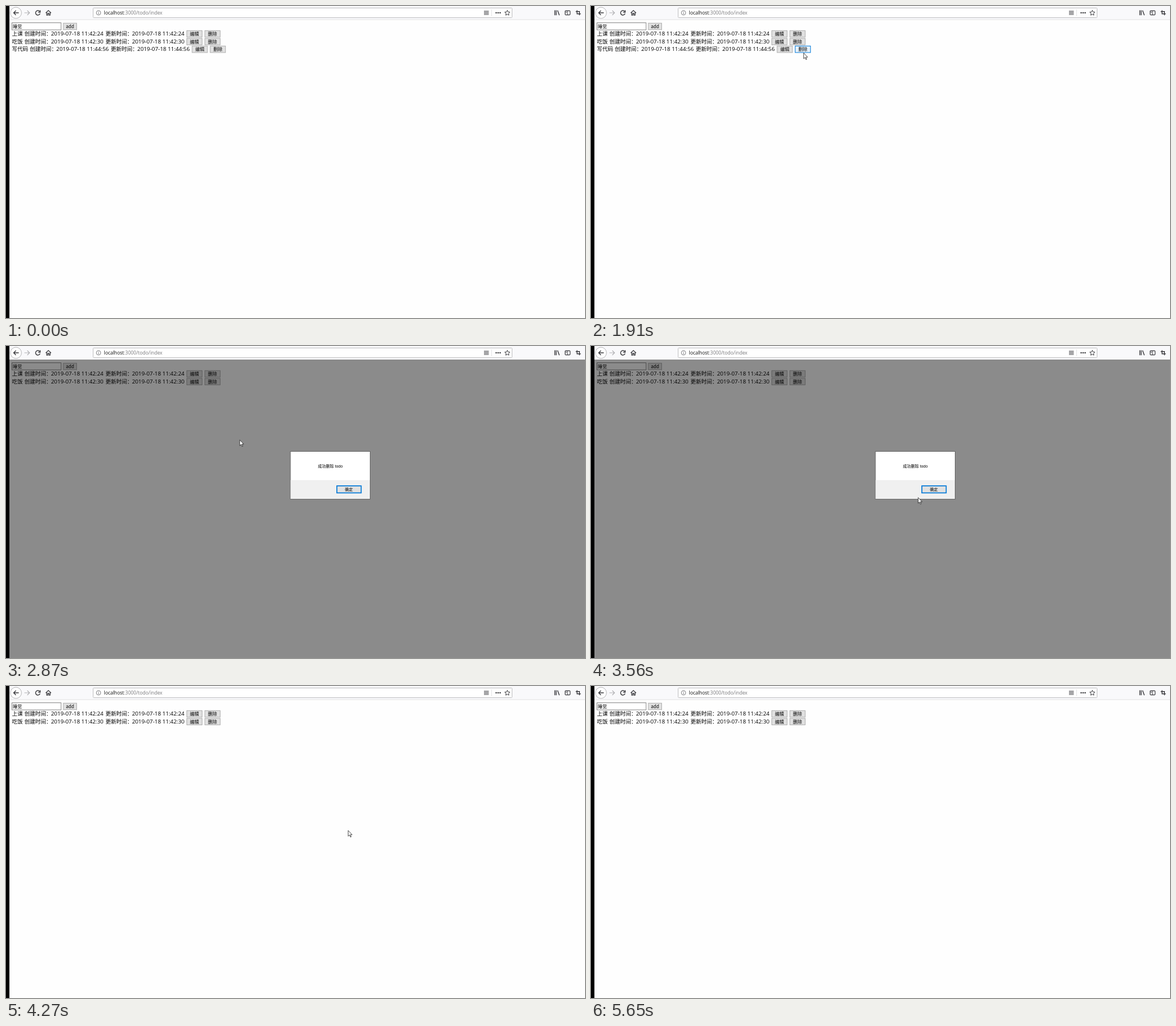
These frames come from a looping animation (1020x549 px, 6.05 s). An HTML page:

```html
<!DOCTYPE html>
<html lang="zh-CN">
<head>
<meta charset="utf-8">
<title>todo</title>
<style>
html, body { margin: 0; width: 100%; height: 100%; overflow: hidden; background: #fefefe }
svg { display: block; width: 1020px; height: 549px }
text { font: 9.5px "Noto Sans CJK SC", "Noto Sans CJK", sans-serif }
.latin { font: 9.8px "Open Sans", "Noto Sans", sans-serif }
.url { font: 8.45px "Open Sans", "Noto Sans", sans-serif }
.small { font-size: 8px; text-anchor: middle }
.alert { font: 7px "Liberation Sans", "Noto Sans CJK SC", "Noto Sans CJK", sans-serif; text-anchor: middle }
.icon { fill: none; stroke: #3a3a3e; stroke-width: 1.2 }
</style>
</head>
<body>
<svg viewBox="0 0 1020 549">
  <rect width="1020" height="549" fill="#fefefe"/>
  <rect x="6" width="1014" height="24" fill="#f9f9fb"/>
  <path d="M6 24H1020" stroke="#e1e1e2"/>
  <rect width="6" height="549"/>

  <g class="icon">
    <circle cx="17.5" cy="12" r="9.8" fill="#fff" stroke="#b4b4b6" stroke-width="1"/>
    <path d="M22.5 12H13.5M17.5 8L13.5 12L17.5 16" stroke-width="1.4"/>
    <path d="M32.5 12H41.5M37.5 8L41.5 12L37.5 16" stroke="#b0b0b3"/>
    <path d="M59.3 9.5A4 4 0 1 0 60 13.2M60.3 7.5V11H56.8" stroke-width="1.4"/>
    <path d="M70 12.3L74.7 7.8L79.4 12.3M71.7 11.5V16.2H73.7V13H75.7V16.2H77.7V11.5" stroke-width="1.3"/>
    <rect x="153.5" y="3.5" width="738" height="17" rx="1" fill="#fff" stroke="#bdbdbf" stroke-width="1"/>
    <circle cx="163" cy="12" r="3.9" stroke="#707074" stroke-width=".9"/>
    <path d="M163 11.3V14.3M163 9.5V10.4" stroke="#707074" stroke-width="1"/>
    <rect x="842" y="8" width="8.5" height="8" fill="#a5a5a7" stroke="none"/>
    <path d="M855.5 6V18" stroke="#e2e2e4" stroke-width="1"/>
    <path d="M862.3 12H864.7M865.8 12H868.2M869.3 12H871.7" stroke-width="2"/>
    <path id="star" stroke-width="1" stroke-linejoin="round"/>
    <path d="M966.8 7.5V16.3M969.3 7.5V16.3M971.6 7.8L974.8 16.3" stroke-width="1.4"/>
    <rect x="985" y="8.3" width="8.7" height="7.4" rx="1.2"/>
    <path d="M989.4 8.3V15.7M986.3 10.2H988M986.3 11.8H988" stroke-width=".9"/>
    <path d="M1006 7.5V13.8H1012.5M1003.7 9.8H1010.3V16.3" stroke-width="1.4"/>
  </g>
  <text class="url" x="172.5" y="15" fill="#111">localhost<tspan fill="#77777a">:3000/todo/index</tspan></text>

  <rect x="10.5" y="29.5" width="86.5" height="12.5" fill="#fff" stroke="#858585"/>
  <text x="12" y="39" style="font-size:8px">睡觉</text>
  <g id="list"></g>

  <g id="modal">
    <rect x="6" y="24" width="1014" height="525" fill-opacity=".453"/>
    <rect x="501" y="185.5" width="140.5" height="84" fill="#fff" stroke="#666"/>
    <rect x="501.5" y="236" width="139.5" height="33" fill="#f0f0f0"/>
    <text class="alert" x="571.3" y="214">成功删除 todo</text>
    <rect id="ok"/>
    <text class="alert" x="604" y="254.5">确定</text>
  </g>
  <path id="cursor" d="M0 0V10L2.3 7.9L4 11.6L5.4 11L3.8 7.4H7Z" fill="#fff" stroke="#111" stroke-width=".75"/>
</svg>
<script>
const LOOP = 6050, START = 430, STEP = 78;
const $ = id => document.getElementById(id);

const looks = {
  plain: ['#e1e1e1', '#adadad', 1],
  hover: ['#e5f1fb', '#0078d7', 1],
  down: ['#cce4f7', '#005499', 1],
  focus: ['#e1e1e1', '#0078d7', 1.7]
};

// Keeps the border inside the given box for every line weight.
function paint(rect, x, y, w, h, look) {
  const [fill, stroke, line] = looks[look];
  const attrs = { x: x + line / 2, y: y + line / 2, width: w - line, height: h - line,
    fill, stroke, 'stroke-width': line };
  for (const key in attrs) rect.setAttribute(key, attrs[key]);
}

function add(parent, tag, className, x, y, content = '') {
  const node = document.createElementNS('http://www.w3.org/2000/svg', tag);
  if (className) node.setAttribute('class', className);
  node.setAttribute('x', x);
  node.setAttribute('y', y);
  node.textContent = content;
  return parent.appendChild(node);
}

function button(parent, x, y, w, label) {
  const rect = add(parent, 'rect', '', x, y);
  paint(rect, x, y, w, 12.5, 'plain');
  add(parent, 'text', 'small', x + w / 2, y + 9.2, label);
  return rect;
}

function row(title, time, y, shift) {
  const group = add($('list'), 'g', '', 0, 0), stamp = '2019-07-18 ' + time;
  add(group, 'text', '', 10.5, y + 9.5, title);
  ['创建时间：', '更新时间：'].forEach((label, i) => {
    const x = 32.5 + shift + i * 142.7;
    add(group, 'text', '', x, y + 9.5, label);
    add(group, 'text', 'latin', x + 46.7, y + 9.3, stamp);
  });
  button(group, 318 + shift, y, 28, '编辑');
  const remove = button(group, 349.8 + shift, y, 28, '删除');
  return { group, remove };
}

button($('list'), 100.5, 29.7, 24.5, 'add');
row('上课', '11:42:24', 42.8, 0);
row('吃饭', '11:42:30', 56.4, 0);
const last = row('写代码', '11:44:56', 69.9, 9.4);

$('star').setAttribute('d', 'M' + Array.from({ length: 10 }, (_, i) => {
  const r = i % 2 ? 2.3 : 4.8, a = i * Math.PI / 5;
  return (883.2 + r * Math.sin(a)).toFixed(2) + ' ' + (12.3 - r * Math.cos(a)).toFixed(2);
}).join('L') + 'Z');

// Pointer path: step, x, y
const path = [
  [0, 675, 400], [3, 560, 300], [7, 433.5, 201], [8, 433.3, 199.5], [11, 405, 148],
  [15, 378, 99], [18, 375, 84], [21, 374, 80], [26, 374, 80], [28, 378, 95],
  [30, 394.3, 129.5], [31, 411.8, 165.3], [34, 450, 229], [36, 496, 256],
  [39, 565, 268], [42, 599, 264], [44, 602, 257], [46, 602.8, 254.3], [50, 602.8, 254.3],
  [52, 680, 302], [55, 830, 398], [58, 937.5, 482], [62, 985, 522], [66, 1013, 548]
];

function pointer(step) {
  const i = Math.max(1, path.findIndex(p => p[0] >= step));
  const [a, ax, ay] = path[i - 1], [b, bx, by] = path[i];
  const f = (step - a) / (b - a);
  return [ax + (bx - ax) * f, ay + (by - ay) * f];
}

function draw(now) {
  const t = now % LOOP, step = Math.floor((t - START + 10) / STEP);
  const shown = t >= START && t < 5650;
  $('cursor').style.display = shown ? '' : 'none';
  if (shown) {
    const at = pointer(Math.min(66, Math.max(0, step)));
    $('cursor').setAttribute('transform', `translate(${at})`);
  }
  const removeLook = t < 1750 ? 'plain' : t < 2230 ? 'hover' : t < 2390 ? 'down'
    : t < 2560 ? 'hover' : 'focus';
  paint(last.remove, 359.2, 69.9, 28, 12.5, removeLook);
  last.group.style.display = t < 2870 ? '' : 'none';
  $('modal').style.display = t >= 2870 && t < 4270 ? '' : 'none';
  paint($('ok'), 582, 245.3, 44.5, 14, t < 3870 ? 'focus' : t < 4110 ? 'hover' : 'down');
  requestAnimationFrame(tick);
}

const origin = performance.now();
function tick() { draw(performance.now() - origin); }
tick();
</script>
</body>
</html>
```
